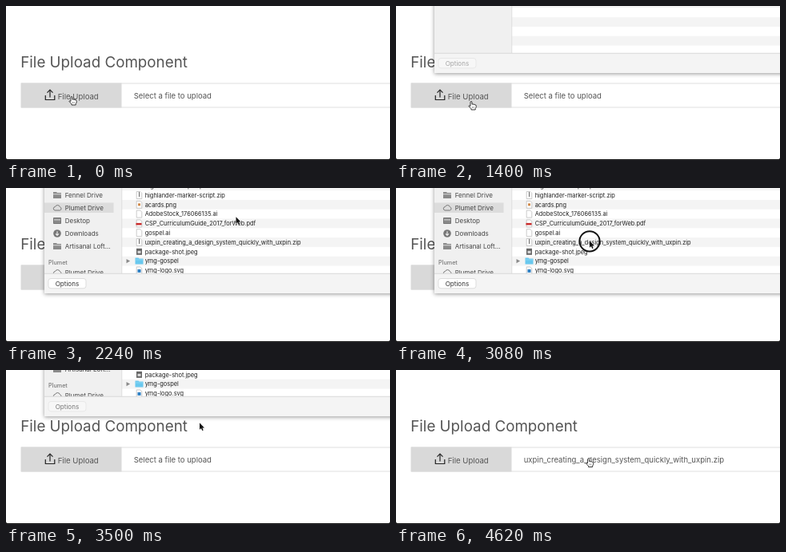
An HTML page with a canvas for the animation above (4690 ms loop, 480 by 193 pixels).

```html
<!DOCTYPE html>
<html lang="en">
<head>
<meta charset="utf-8">
<title>File upload</title>
<style>
  html, body { margin: 0; width: 100%; height: 100%; overflow: hidden; background: #fff; }
  canvas { display: block; width: 480px; height: 193px; }
</style>
</head>
<body>
<canvas id="stage"></canvas>
<script>
const W = 480, H = 193, LOOP = 4690, STEP = 70;
const FILE = 'uxpin_creating_a_design_system_quickly_with_uxpin.zip';
const ROW = 11.8, FIRST_ROW = 9, PICKED = 5;

const FILES = [
  ['highlander-marker-script.zip', 'zip'],
  ['acards.png', 'image'],
  ['AdobeStock_176066135.ai', 'doc'],
  ['CSP_CurriculumGuide_2017_forWeb.pdf', 'pdf'],
  ['gospel.ai', 'doc'],
  [FILE, 'zip'],
  ['package-shot.jpeg', 'photo'],
  ['ymg-gospel', 'folder'],
  ['ymg-logo.svg', 'svg']
];
const PLACES = [
  ['Fennel Drive', 9, 'folder'],
  ['Plumet Drive', 25, 'cloud'],
  ['Desktop', 41, 'desktop'],
  ['Downloads', 57, 'download'],
  ['Artisanal Loft...', 73, 'folder'],
  ['Plumet Drive', 106, 'cloud']
];

// [time, x, y] of the pointer tip
const POINTER = [
  [0, 82, 113], [840, 82, 113], [1400, 94, 119], [1540, 97, 118],
  [1960, 240, 62], [2240, 287.5, 36.2], [2520, 267, 50], [3010, 242, 66.3],
  [4340, 242, 66.3], [4620, 240.5, 110.5], [LOOP, 240.5, 110.5]
];
// [time, vertical offset] of the sheet
const SHEET = [
  [0, -150], [1260, -150], [1330, -112], [1400, -48], [1470, -10], [1540, 0],
  [3360, 0], [3430, -18], [3500, -74], [3570, -150], [LOOP, -150]
];
// [time, radius, opacity] of the click ring
const RING = [
  [0, 0, 0], [420, 19, 1], [630, 19, .55], [700, 19, .22], [770, 0, 0],
  [3080, 12.6, 1], [3150, 17, .6], [3220, 19, .25], [3290, 0, 0]
];

const canvas = document.getElementById('stage');
const ctx = canvas.getContext('2d');
const dpr = window.devicePixelRatio || 1;
canvas.width = W * dpr;
canvas.height = H * dpr;

function track(keys, t) {
  const i = Math.max(1, keys.findIndex(k => k[0] >= t));
  const a = keys[i - 1], b = keys[i];
  const p = (t - a[0]) / (b[0] - a[0]);
  return a.slice(1).map((v, n) => v + (b[n + 1] - v) * p);
}

function rect(x, y, w, h, color) {
  ctx.fillStyle = color;
  ctx.fillRect(x, y, w, h);
}

function text(s, x, y, size, color, weight = 400) {
  ctx.font = `${weight} ${size}px Inter, "Liberation Sans", sans-serif`;
  ctx.fillStyle = color;
  ctx.fillText(s, x, y);
}

function line(points, color, width = 1) {
  ctx.beginPath();
  points.forEach(([x, y]) => ctx.lineTo(x, y));
  ctx.strokeStyle = color;
  ctx.lineWidth = width;
  ctx.stroke();
}

function shape(d, x, y, fill, stroke, width = 1) {
  const path = new Path2D(d);
  ctx.save();
  ctx.translate(x, y);
  ctx.lineJoin = 'round';
  if (fill) { ctx.fillStyle = fill; ctx.fill(path); }
  if (stroke) { ctx.strokeStyle = stroke; ctx.lineWidth = width; ctx.stroke(path); }
  ctx.restore();
}

function drawPage(t) {
  rect(0, 0, W, H, '#fff');
  text('File Upload Component', 18.2, 77, 18.8, '#555');
  rect(19, 96.5, W - 19, 1, '#e0e0e0');
  rect(19, 126.5, W - 19, 1, '#e0e0e0');
  rect(18.5, 96.5, 126, 31, '#d9d9d9');
  line([[49.3, 112], [49.3, 117.5], [60.8, 117.5], [60.8, 112]], '#222', 1.2);
  line([[55, 114.5], [55, 105.5]], '#222', 1.2);
  line([[51.5, 108.7], [55, 105.2], [58.5, 108.7]], '#222', 1.2);
  text('File Upload', 64.7, 117, 9.6, '#555');
  text(t < 3990 ? 'Select a file to upload' : FILE, 159.7, 116, 9.52, '#555');
}

function drawFileIcon(kind, x, y) {
  if (kind === 'folder') {
    shape('M0 -4H4L5 -3H10V4H0Z', x - 5, y, '#69c8ee');
    rect(x - 5, y - 2, 10, .7, '#9bdcf6');
    shape('M0 -2.6L4.6 0L0 2.6Z', x - 16, y, '#8a8a8a');
    return;
  }
  if (kind === 'photo') {
    rect(x - 3.5, y - 4, 7, 8, '#666');
    rect(x - 2, y - 1, 4, 3, '#ddd');
    return;
  }
  shape('M-3.3 -4.5H1.3L3.3 -2.5V4.5H-3.3Z', x, y, '#fff', '#b5b5b5', .7);
  if (kind === 'image') rect(x - 1.5, y - 1.5, 3, 3, '#d08a4a');
  if (kind === 'pdf') rect(x - 4, y - .5, 7, 2.5, '#c92b2b');
  if (kind === 'svg') rect(x - 2, y - 1.5, 4, 4, '#2b7fc4');
  if (kind === 'zip') rect(x - .5, y - 4, 1, 6, '#666');
}

function drawPlaceIcon(kind, x, y) {
  const gray = '#777';
  if (kind === 'cloud') {
    shape('M-3 3H3.5A2.2 2.2 0 0 0 3.5 -1.2A3.2 3.2 0 0 0 -2.5 -1.5A2.3 2.3 0 0 0 -3 3Z', x, y, null, gray, 1);
  } else if (kind === 'desktop') {
    shape('M-4.5 -3.5H4.5V3.5H-4.5Z', x, y, '#8a8a8a', gray, 1);
    rect(x - 4, y - 1.5, 8, .8, '#f0f0f0');
  } else if (kind === 'download') {
    shape('M4.8 0A4.8 4.8 0 1 1 -4.8 0A4.8 4.8 0 1 1 4.8 0', x, y, gray);
    shape('M0 -2.7V2.3M-2 .3L0 2.3L2 .3', x, y, null, '#f0f0f0', 1.1);
  } else {
    shape('M-5 -4H-1L0 -3H5V4H-5Z', x, y, '#8a8a8a');
    rect(x - 5, y - 1.6, 10, .8, '#f0f0f0');
  }
}

function drawPlaces() {
  rect(48, 18.5, 86.5, 12.5, '#dcdcdc');
  PLACES.forEach(([name, y, icon]) => {
    drawPlaceIcon(icon, 64, y);
    text(name, 73.7, y + 3, 8, '#444');
  });
  text('Plumet', 53, 96, 7.2, '#777', 500);
}

function drawFiles(t) {
  text('highlander-script.zip', 174, FIRST_ROW - ROW + 2.7, 7.42, '#222');
  FILES.forEach(([name, icon], i) => {
    const y = FIRST_ROW + i * ROW;
    const picked = i === PICKED && t >= 3150;
    if (picked) rect(145, y - ROW / 2, W - 145, ROW, '#1261d1');
    drawFileIcon(icon, 166.5, y);
    text(name, 173.7, y + 2.7, 7.42, picked ? '#fff' : '#222', picked ? 500 : 400);
  });
}

function drawSheet(t) {
  const [offset] = track(SHEET, t);
  if (offset <= -140) return;
  const loaded = t >= 2030;
  const enabled = loaded && t < 3430;
  ctx.save();
  ctx.translate(0, offset);

  ctx.save();
  ctx.shadowColor = 'rgba(0,0,0,.42)';
  ctx.shadowBlur = 5 * dpr;
  ctx.shadowOffsetY = dpr;
  rect(48, -200, W, 332, '#f4f4f4');
  ctx.restore();

  ctx.save();
  ctx.beginPath();
  ctx.rect(48, -200, W, 307);
  ctx.clip();
  rect(48, -200, 97, 307, '#f0f0f0');
  rect(145, -200, W, 307, '#fff');
  for (let i = -15; i < FILES.length; i += 2) {
    rect(145, FIRST_ROW + (i - .5) * ROW, W - 145, ROW, '#f4f4f4');
  }
  if (loaded) {
    drawPlaces();
    drawFiles(t);
  }
  rect(144.5, -200, .7, 307, '#d5d5d5');
  ctx.restore();

  rect(48, 106.8, W, .8, '#d3d3d3');
  ctx.beginPath();
  ctx.roundRect(53, 113.5, 47, 12.3, 3);
  ctx.fillStyle = enabled ? '#fff' : '#f7f7f7';
  ctx.fill();
  ctx.strokeStyle = enabled ? '#d0d0d0' : '#e2e2e2';
  ctx.lineWidth = .7;
  ctx.stroke();
  text('Options', 61.7, 122.6, 8.05, enabled ? '#333' : loaded ? '#777' : '#a5a5a5');
  ctx.restore();
}

function drawPointer(t) {
  const [x, y] = track(POINTER, t);
  const [, radius, alpha] = RING.filter(k => k[0] <= t).pop();
  if (alpha) {
    ctx.globalAlpha = alpha;
    ctx.beginPath();
    ctx.arc(x, y + .5, radius, 0, Math.PI * 2);
    ctx.strokeStyle = '#111';
    ctx.lineWidth = 2;
    ctx.stroke();
    ctx.globalAlpha = 1;
  }
  const hand = t < 1540 || (t > 4400 && y > 97);
  if (hand) {
    shape('M-1 1.2Q0 -.3 1 1.2V4.2Q2.2 3.4 3 4.4Q4.2 3.8 4.8 4.9Q6.3 4.7 6.3 6.3Q6.3 8.5 5.2 9.5V11H0V9.8L-3 6.6Q-3.2 5.2 -1 6.4Z',
      x, y, '#fff', '#222', .9);
    line([[x + 1.4, y + 7], [x + 1.4, y + 9]], '#555', .6);
    line([[x + 3.2, y + 7], [x + 3.2, y + 9]], '#555', .6);
  } else {
    const arrow = 'M0 0V8.4L1.9 6.7L3.3 9.8L4.7 9.2L3.4 6.2H6Z';
    shape(arrow, x, y, null, '#fff', 1);
    shape(arrow, x, y, '#111');
  }
}

function drawEdge() {
  ctx.beginPath();
  ctx.rect(0, 0, W, H);
  ctx.roundRect(0, -10, W, 202, 2);
  ctx.fillStyle = '#111';
  ctx.fill('evenodd');
}

function frame(now) {
  const t = Math.floor(now % LOOP / STEP) * STEP;
  ctx.setTransform(dpr, 0, 0, dpr, 0, 0);
  drawPage(t);
  drawSheet(t);
  drawPointer(t);
  drawEdge();
  requestAnimationFrame(frame);
}
frame(performance.now());
</script>
</body>
</html>
```
